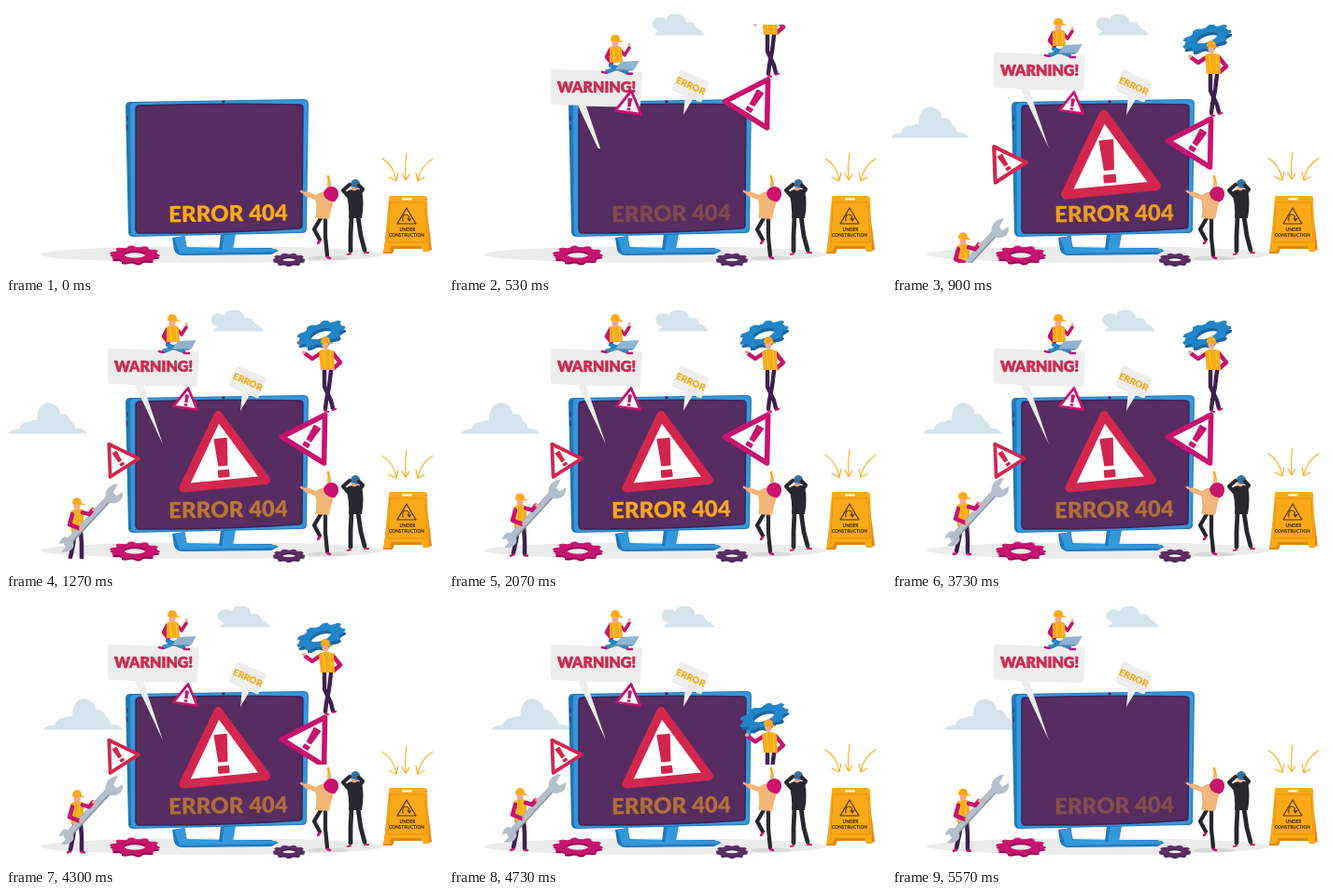
Animation of 468 by 288 pixels, one loop 5610 ms. Source, as an HTML page:

```html
<!DOCTYPE html>
<html lang="en">
<head>
<meta charset="utf-8">
<title>Error 404</title>
<style>
  html, body { margin: 0; width: 100%; height: 100%; overflow: hidden; background: #fff; }
  svg { display: block; width: 468px; height: 288px; }
  text { font-family: Lato, "Open Sans", sans-serif; font-weight: 900; text-anchor: middle; }
</style>
</head>
<body>
<svg id="stage" viewBox="0 0 468 288"></svg>
<script>
const LOOP = 5610;
const C = {
  blue: '#3498db', deep: '#2478b8', gear: '#2285c7', gearSide: '#1b659f',
  screen: '#572c60', plum: '#3e2050', orange: '#fba919', vest: '#f0cb36',
  red: '#d3264f', pink: '#c8136f', skin: '#f3a98c', tan: '#f2b678',
  shade: '#ebebeb', cloud: '#d5e3ea', steel: '#b4bfca', bubble: '#ededed', black: '#27272d'
};

const shape = (d, fill, extra = '') => `<path d="${d}" fill="${fill}" ${extra}/>`;
const line = (d, color, width) =>
  `<path d="${d}" fill="none" stroke="${color}" stroke-width="${width}" stroke-linecap="round" stroke-linejoin="round"/>`;
const oval = (x, y, rx, ry, fill) => `<ellipse cx="${x}" cy="${y}" rx="${rx}" ry="${ry}" fill="${fill}"/>`;
const group = (id, body) => `<g id="${id}">${body}</g>`;
const clipped = (clip, id, body) => `<g clip-path="url(#${clip})">${group(id, body)}</g>`;
const clip = (id, x, y, w, h) =>
  `<clipPath id="${id}"><rect x="${x}" y="${y}" width="${w}" height="${h}"/></clipPath>`;

// A toothed ring seen at an angle, with a darker side below it.
function gear(x, y, rx, ry, teeth, color, side, depth, turn = 0) {
  let d = '';
  for (let i = 0; i < teeth * 4; i++) {
    const a = (i + 0.5) / (teeth * 4) * Math.PI * 2;
    const r = i % 4 < 2 ? 1 : 0.82;
    d += `${i ? 'L' : 'M'}${(rx * r * Math.cos(a)).toFixed(2)} ${(ry * r * Math.sin(a)).toFixed(2)}`;
  }
  const hx = rx * 0.46, hy = ry * 0.46;
  d += `ZM${-hx} 0a${hx} ${hy} 0 1 0 ${hx * 2} 0a${hx} ${hy} 0 1 0 ${-hx * 2} 0Z`;
  return `<g transform="translate(${x} ${y}) rotate(${turn})" fill-rule="evenodd" stroke-linejoin="round">
    ${shape(d, side, `transform="translate(0 ${depth})"`)}${shape(d, color, `stroke="${color}"`)}</g>`;
}

const alertSign = color =>
  `<path d="M0-49L43 23L-43 23Z" fill="#fff" stroke="${color}" stroke-width="9" stroke-linejoin="round"/>
   <g stroke="${color}" stroke-width="2" stroke-linejoin="round">
   ${shape('M-6-24H6L4 3H-4Z', color)}${shape('M-5 9H5V15H-5Z', color)}</g>`;

const cloudL = shape('M0 33Q3 28 12 28Q14 20 24 20Q28 17 31 19Q31 0 44 0Q55 1 56 12Q64 10 67 19Q72 22 72 27Q82 27 85 33Z', C.cloud);
const cloudR = shape('M3 23Q5 20 8 18Q0 16 1 9Q4 3 10 4Q14 4 16 6Q17 0 25 0Q36 0 37 9Q46 7 48 15Q55 17 57 23Z', C.cloud);

function helmet(x, y) {
  return oval(x, y + 3, 3.6, 4.6, C.skin) +
    shape(`M${x - 5} ${y + 1}Q${x - 5} ${y - 6} ${x} ${y - 6}Q${x + 5} ${y - 6} ${x + 5} ${y}L${x + 8} ${y + 1}V${y + 2}Z`, C.orange);
}

function monitor() {
  return shape('M178 249L191 247L194 260L284 260L292 263L284 267L190 268Q182 268 180 262Z', C.deep) +
    shape('M180 249L192 247L193 259L290 261L288 264L186 266Z', C.blue) +
    shape('M230 245H243V262H228Z', C.deep) + shape('M234 245H246L243 262H231Z', C.blue) +
    shape('M128 108Q128 103 133 103L318 100Q324 100 324 105L322 240Q322 244 317 244L137 248Q131 248 131 243Z', C.deep) +
    shape('M133 108Q133 104 138 104L317 101Q323 101 323 106L321 239Q321 243 316 243L138 247Q134 247 134 242Z', C.blue) +
    shape('M139 111Q139 107 143 107Q230 104 315 106Q318 106 318 110L317 236Q317 239 313 239Q230 245 143 244Q139 244 139 240Z', C.screen,
      `stroke="${C.plum}" stroke-width="1.4"`) +
    oval(233, 103, 1.6, 1.4, C.plum) + line('M130 118V123M130 128V133', C.plum, 1);
}

function watchers() {
  return oval(345, 271, 22, 2.5, '#d8d8d8') +
    // woman
    line('M337 228L330 240L336 251M342 228L342 248L344 268', C.black, 4.2) +
    line('M336 253L334 255M344 270L347 271', C.pink, 2.5) +
    line('M346 200L346 190', C.tan, 4.5) + line('M346 188L345 183', C.orange, 2.6) +
    shape('M330 205Q337 198 346 200L352 207Q349 214 346 229L331 228Q334 216 330 205Z', C.tan) +
    line('M335 207L322 202', C.tan, 5.5) + line('M319 201L316 199', C.skin, 2.6) +
    shape('M340 201Q342 194 349 194Q357 195 356 204Q353 212 349 210Q341 209 340 201Z', C.pink) +
    // man
    line('M370 226L369 247L369 263M377 226L380 247L384 262', C.black, 4.8) +
    line('M369 266L366 267M384 265L388 265', C.red, 2) +
    shape('M364 200Q372 194 381 198Q384 211 381 228H367Q368 214 364 200Z', C.black) +
    oval(373, 194, 3.6, 4.6, C.skin) +
    shape('M369 193Q369 186 375 186Q381 188 378 196Q373 196 369 193Z', '#2f719f') +
    line('M366 204L361 198L368 192M379 201L382 197L378 193', C.black, 4.2);
}

function floorSign() {
  return shape('M412 205H449L456 262L448 264L447 261H416L414 266H404Z', '#df8a12') +
    shape('M410 206Q410 204 413 204H448Q451 204 451 207L453 264H447L445 258H413L411 264H405Z', C.orange) +
    shape('M411 211H449L451 254H409Z', C.orange, 'stroke="#e7920f" stroke-width="1"') +
    line('M425 207.5H434', '#fff', 1.8) +
    line('M429 217L439 234H419Z', '#4b3410', 1.2) +
    line('M425 231Q424 224 428 224Q432 224 432 230M430 228L432 231L434 228', '#4b3410', 1.1) +
    `<g fill="#4b3410" font-size="4.8"><text x="430" y="242">UNDER</text><text x="429" y="247.5">CONSTRUCTION</text></g>`;
}

const arrows = line('M403 163Q415 170 418 186M410 183L418 187L420 178M429 157Q427 170 428 185M424 179L428 186L432 180M457 163Q444 171 441 186M439 178L441 187L448 183', C.orange, 1.1);

function sitter() {
  return shape('M109 52Q109 50 112 50L204 53Q207 53 207 56L205 88Q205 91 202 91L147 90L168 153L138 89L112 88Q109 88 109 85Z', C.bubble) +
    `<text x="158" y="75" font-size="16" fill="${C.red}" stroke="${C.red}" stroke-width=".5">WARNING!</text>` +
    line('M173 46L190 53M186 46L169 53', C.gear, 4.5) +
    line('M191 55L196 55M168 54L164 53', C.pink, 2.5) +
    line('M173 29L169 37L174 43', C.pink, 4.5) +
    line('M184 30L188 35L193 27', C.pink, 3.6) + oval(193, 24, 1.5, 2, C.skin) +
    shape('M172 27Q178 23 185 27L186 43H172Z', C.orange) +
    line('M176 27L177 42M182 27L183 42', C.vest, 1.2) +
    shape('M178 51L184 42L204 41L198 51Z', '#8fb4d0') + line('M168 51H196', '#5e87a8', 1.4) +
    helmet(178, 19);
}

function gearCarrier() {
  return `<g transform="translate(325.5 147) rotate(32) scale(.62)">${alertSign(C.pink)}</g>` +
    line('M341 74L341 91L348 106L350 114M348 74L346 91L343 106L342 115', C.plum, 4.4) +
    line('M350 116L353 115M342 117L345 118', C.pink, 2.2) +
    gear(337, 34, 27, 12, 9, C.gear, C.gearSide, 4, -19) +
    line('M337 55L328 61L321 56', C.pink, 4.5) + oval(319, 54, 2, 2, C.skin) +
    line('M350 55L358 65L351 71', C.pink, 4.5) +
    shape('M335 53Q343 48 351 53L352 73H337Z', C.orange) +
    line('M340 53L342 72M347 52L348 72', C.vest, 1.3) + helmet(342, 43);
}

function mechanic() {
  return line('M74 239L72 254L69 268M80 239L81 254L81 269', C.plum, 4.5) +
    line('M69 270L66 271M81 271L84 271', C.pink, 2.5) +
    shape('M69 219Q76 213 83 218L83 241H70Z', C.orange) +
    line('M73 217V240M79 216V240', C.vest, 1.3) +
    line('M66 253L112 203', '#8999a8', 7.5) + line('M66 252L112 202', C.steel, 5.5) +
    shape('M108 208Q104 199 110 193Q115 189 120 189L115 198L118 202L125 198Q126 205 121 208Q115 212 108 208Z', C.steel) +
    shape('M70 248Q75 255 70 260Q65 264 59 262L64 257L62 253L57 254Q58 248 63 246Z', C.steel) +
    line('M71 222L68 233L78 237', C.pink, 4.5) + line('M82 220L89 222L93 217', C.pink, 4.5) +
    oval(80, 237, 2, 2, C.skin) + oval(94, 217, 2, 2, C.skin) + helmet(76, 210);
}

document.getElementById('stage').innerHTML =
  `<defs>${clip('sitBox', 105, 8, 110, 145)}${clip('carryBox', 285, 20, 85, 159)}${clip('workBox', 50, 188, 82, 88)}</defs>` +
  oval(221, 267, 184, 9, C.shade) +
  group('cloudL', cloudL) + group('cloudR', cloudR) +
  monitor() +
  gear(138, 267, 26.5, 9, 10, C.pink, '#8f0d57', 2.5) +
  gear(303, 272, 17, 6, 9, '#5f2c66', C.plum, 2) +
  `<text id="code" transform="rotate(-1 238 223)" x="238" y="231.5" font-size="24" fill="${C.orange}">ERROR 404</text>` +
  floorSign() + group('arrows', arrows) + watchers() +
  group('center', alertSign(C.red)) +
  clipped('sitBox', 'sitter', sitter()) +
  group('note', shape('M-12-17Q-11-19-9-18L18-6Q20-5 19-3L12 15Q11 17 9 16L2 13L-8 30L-6 10L-19 4Q-21 3-20 1Z', C.bubble) +
    `<text transform="translate(-1.5 2) rotate(24)" font-size="10" fill="${C.orange}">ERROR</text>`) +
  group('small', alertSign(C.pink)) +
  group('left', alertSign(C.red)) +
  clipped('workBox', 'mechanic', mechanic()) +
  clipped('carryBox', 'carrier', gearCarrier());

const el = {};
document.querySelectorAll('[id]').forEach(n => el[n.id] = n);

const span = (t, start, length) => Math.min(1, Math.max(0, (t - start) / length));
const easeOut = p => Math.sin(p * Math.PI / 2);
const easeIn = p => 1 - Math.cos(p * Math.PI / 2);
const overshoot = p => 1 + 2.7 * (p - 1) ** 3 + 1.7 * (p - 1) ** 2;
const move = (node, value) => node.setAttribute('transform', value);

function pop(node, x, y, turn, size, grow) {
  node.style.display = grow > 0.002 ? '' : 'none';
  move(node, `translate(${x} ${y}) rotate(${turn}) scale(${size * grow})`);
}

// Pops in at the first time and out again at the second.
const life = (t, start, end) => overshoot(span(t, start, 600) - span(t, end, 600));

function draw(t) {
  const wave = (t - 15) / 1000 * Math.PI * 2;
  const bob = 1.2 + 1.2 * Math.sin(wave);
  el.code.style.opacity = 0.62 + 0.38 * Math.cos(wave);
  move(el.arrows, `translate(0 ${bob})`);

  move(el.cloudL, `translate(${-13.8 + t * 0.0125} 108.5)`);
  el.cloudL.style.opacity = span(t, 580, 300);
  move(el.cloudR, `translate(${215.5 + t * 0.00235} 8.5)`);
  el.cloudR.style.opacity = span(t, 0, 300);

  move(el.sitter, `translate(0 ${145 * (1 - easeOut(span(t, 0, 780)))})`);
  move(el.mechanic, `translate(0 ${bob + 88 * (1 - easeOut(span(t, 580, 850)))})`);
  const drop = easeIn(span(t, 4150, 800)) - (1 - easeOut(span(t, 110, 800)));
  move(el.carrier, `translate(0 ${160 * drop})`);

  pop(el.note, 259, 87, 0, 1, overshoot(span(t, 0, 500)));
  pop(el.small, 193, 107, 8, 0.3, life(t, 110, 4820));
  pop(el.left, 121.5, 170, -33, 0.42, life(t, 580, 4820));
  pop(el.center, 232, 172, -5.5, 1.03, life(t, 580, 4820));
}

function tick() {
  draw(performance.now() % LOOP);
  requestAnimationFrame(tick);
}
tick();
</script>
</body>
</html>
```
